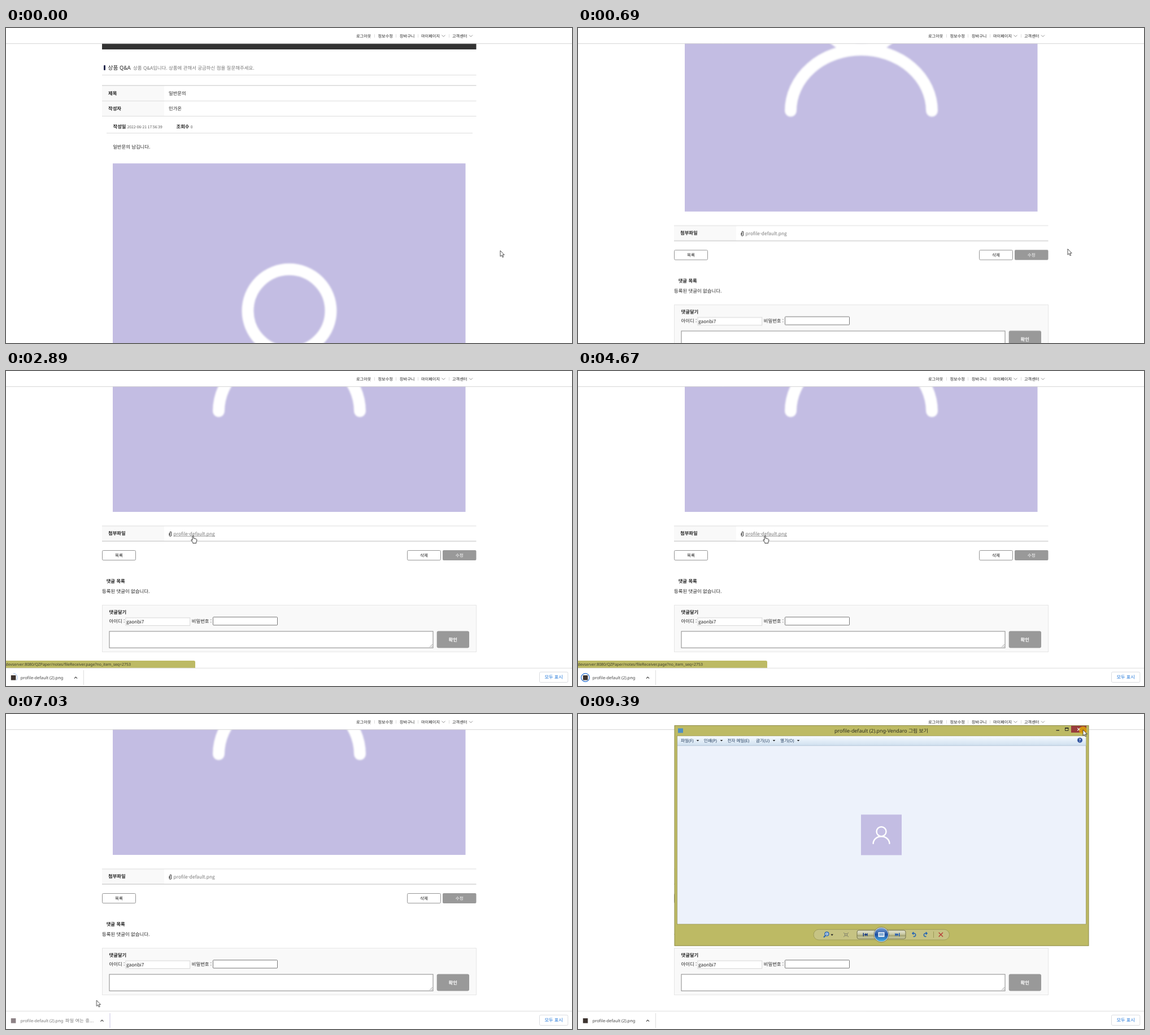
An HTML page that plays this animation: 1002 by 559 pixels, repeating every 9560 ms.

```html
<!DOCTYPE html>
<html lang="ko">
<head>
<meta charset="utf-8">
<title>Q&amp;A</title>
<style>
html, body { margin: 0; width: 100%; height: 100%; overflow: hidden; background: #fff; }
svg { display: block; width: 100vw; height: 100vh; }
text { font: 8.35px 'Noto Sans CJK KR', 'Noto Sans', sans-serif; fill: #222; white-space: pre; text-rendering: geometricPrecision; }
.b { font-weight: 700; }
.mid { text-anchor: middle; }
.small text { font-size: 7.2px; }
.ui text { font-family: 'Noto Sans', 'Noto Sans CJK KR', sans-serif; }
.menu text { font-size: 7.6px; fill: #1e395b; }
.line { stroke: #ddd; fill: none; }
.box { fill: #fff; stroke: #888; }
.grey { fill: #999; }
.th { fill: #f9f9f9; }

/* every part shares one clock */
.k { animation: 9.56s linear infinite; }
.step { animation-timing-function: step-end; }

#page { animation-name: scroll; }
@keyframes scroll {
  0%, 1.36% { transform: translateY(0); animation-timing-function: cubic-bezier(.333, .573, .667, .857); }
  7.22% { transform: translateY(-538px); animation-timing-function: cubic-bezier(.333, 1, .667, 1); }
  13.04%, 100% { transform: translateY(-614px); }
}

#cursor { animation-name: move; }
@keyframes move {
  0%, 1.36% { transform: translate(875px, 395px); }
  7.22% { transform: translate(867px, 392px); }
  10.88% { transform: translate(826px, 387px); animation-timing-function: ease-in-out; }
  17.15% { transform: translate(281px, 306px); animation-timing-function: ease-in-out; }
  20.71% { transform: translate(326px, 299px); }
  22.3%, 51.88% { transform: translate(331px, 292px); animation-timing-function: ease-in-out; }
  61.19%, 70.1% { transform: translate(73px, 540px); }
  71.13%, 72% { transform: translate(121px, 525px); animation-timing-function: ease-in-out; }
  79.6%, 80.54% { transform: translate(586px, 324px); animation-timing-function: ease-in-out; }
  87.5% { transform: translate(899px, 24px); }
  90.27%, 100% { transform: translate(894px, 28px); }
}
#arrow { animation-name: arrow; }
@keyframes arrow { 0% { opacity: 1; } 22.4% { opacity: 0; } 52.3% { opacity: 1; } }
#hand, #under { animation-name: hover; }
@keyframes hover { 0% { opacity: 0; } 22.4% { opacity: 1; } 52.3% { opacity: 0; } }
#click { animation-name: click; }
@keyframes click {
  0% { opacity: 0; } 23.43% { opacity: 1; } 24.37% { opacity: 0; }
  62.03% { opacity: 1; } 62.97% { opacity: 0; } 97.49% { opacity: 1; }
}

#status { animation-name: status; }
@keyframes status {
  0%, 22.6% { opacity: 0; transform: translateY(32px); }
  24.3%, 26.2% { opacity: 1; transform: translateY(32px); }
  28.77%, 53% { opacity: 1; transform: none; }
  55.4%, 100% { opacity: 0; transform: none; }
}
#shelf { animation-name: shelf; }
@keyframes shelf {
  0%, 26.2% { transform: translateY(33px); }
  28.77%, 100% { transform: none; }
}
#ring { animation-name: ring; }
@keyframes ring {
  0%, 28% { opacity: 0; stroke-dashoffset: 100; }
  34.2%, 39.64% { opacity: 1; stroke-dashoffset: 0; }
  43.93%, 45.5% { opacity: 0; stroke-dashoffset: 0; }
  48.85%, 51.88% { opacity: 1; stroke-dashoffset: 0; }
  55.4%, 100% { opacity: 0; stroke-dashoffset: 0; }
}
#ready { animation-name: ready; }
@keyframes ready { 0% { opacity: 1; } 62.97% { opacity: 0; } 97.8% { opacity: 1; } }
#opening { animation-name: opening; }
@keyframes opening { 0% { opacity: 0; } 62.97% { opacity: 1; } 97.8% { opacity: 0; } }

#viewer { transform-origin: 537px 215px; animation-name: viewer; }
@keyframes viewer {
  0%, 74.8% { opacity: 0; transform: scale(.92); animation-timing-function: ease-out; }
  76.9%, 100% { opacity: 1; transform: none; }
}
#prev { animation-name: prev; }
@keyframes prev { 0% { fill: #7584ad; } 81.07% { fill: #173a86; } }
#close { animation-name: close; }
@keyframes close { 0% { fill: #c75050; } 88.5% { fill: #e04343; } 97.49% { fill: #993d3d; } }
</style>
</head>
<body>
<svg viewBox="0 0 1002 559">
  <defs>
    <filter id="soft" x="-10%" y="-10%" width="120%" height="120%"><feGaussianBlur stdDeviation="1.8"/></filter>
    <g id="person" fill="none" stroke="#fff" stroke-width="21" stroke-linecap="round">
      <circle cx="312.5" cy="261.5" r="73.5"/>
      <path d="M187.5 445A125 108.5 0 0 1 437.5 445"/>
    </g>
    <path id="down" d="M-3-1.5 0 1.5 3-1.5" fill="none" stroke="#777" stroke-width=".8"/>
    <path id="up" d="M-2.5 1.3 0-1.2 2.5 1.3" fill="none" stroke="#444" stroke-width="1.2"/>
    <path id="tri" d="M-2.3-1.2H2.3L0 1.4Z" fill="#222"/>
    <path id="turn" d="M-2.6-2.2H.5A2.9 2.9 0 1 1-1.5 3.2M-.8-4.4-3-2.2-.8 0" fill="none" stroke="#2464b4" stroke-width="1.5"/>
    <path id="skip" d="M-4-3h1.6v6H-4ZM-1.8 0 1.4-3V3ZM1 0 4.2-3V3Z"/>
    <linearGradient id="bar" x2="0" y2="1">
      <stop stop-color="#f8fbfe"/><stop offset=".5" stop-color="#e2edf7"/><stop offset="1" stop-color="#d0e0ef"/>
    </linearGradient>
    <linearGradient id="metal" x2="0" y2="1">
      <stop stop-color="#e8e8d6"/><stop offset=".5" stop-color="#c4c49c"/><stop offset=".55" stop-color="#a3a374"/><stop offset="1" stop-color="#cfcfa4"/>
    </linearGradient>
    <linearGradient id="orb" x2="0" y2="1">
      <stop stop-color="#7fa6d8"/><stop offset=".5" stop-color="#1f4f9f"/><stop offset="1" stop-color="#49b4ee"/>
    </linearGradient>
  </defs>
  <rect width="1002" height="559" fill="#fff"/>

  <g id="page" class="k">
    <path d="M170 0H832.5V38H170Z" fill="#333"/>
    <rect x="173" y="66" width="3" height="9" rx="1.2" fill="#23284d"/>
    <text x="180.5" y="74" style="font-size:9.7px">상품 Q&amp;A</text>
    <text x="225" y="74" style="font-size:8.45px;fill:#777">상품 Q&amp;A입니다. 상품에 관해서 궁금하신 점을 질문해주세요.</text>
    <path class="th" d="M170 102H280V156H170Z"/>
    <path class="line" d="M170 83.5H832.5M170 129.5H832.5M170 156.5H832.5M178 186.5H826"/>
    <path class="line" d="M170 102H832.5" style="stroke:#c4c4c4"/>
    <text class="b" x="181" y="118.5">제목</text><text x="288" y="119.3">일반문의</text>
    <text class="b" x="181" y="145.5">작성자</text><text x="288" y="146.3">민가온</text>
    <text class="b" x="189.5" y="178">작성일</text>
    <text x="214.5" y="177.8" style="font-size:6.7px;fill:#555">2022-06-21 17:56:39</text>
    <text class="b" x="301.5" y="178">조회수</text>
    <text x="326.7" y="177.8" style="font-size:6.7px;fill:#555">0</text>
    <text x="189.2" y="214.3">일반문의 남깁니다.</text>
    <g transform="translate(189 240.3)">
      <rect width="624.5" height="623.7" fill="#c3bde3"/>
      <use href="#person" filter="url(#soft)"/>
    </g>

    <g transform="translate(0 614)">
      <path class="th" d="M170 275H280V302H170Z"/>
      <path class="line" d="M170 275H832.5M170 534.5H832.5"/>
      <path class="line" d="M170 302H832.5" style="stroke:#bbb"/>
      <text class="b" x="181" y="291.3">첨부파일</text>
      <path d="M289 288V291.2A1.9 1.9 0 0 0 292.8 291.2V286.6A1.3 1.3 0 0 0 290.2 286.6V291" fill="none" stroke="#444" stroke-width="1.1"/>
      <text x="296.6" y="291.9" style="fill:#777">profile-default.png</text>
      <path id="under" class="k step" d="M296.6 293.3H370" stroke="#888" stroke-width=".8"/>

      <g stroke-width=".9">
        <rect class="box" x="170.5" y="318.5" width="59" height="17.2" rx="2"/>
        <rect class="box" x="710.5" y="318.5" width="59" height="17.2" rx="2"/>
        <rect class="grey" x="773" y="318" width="59.5" height="18" rx="2"/>
      </g>
      <g class="mid" style="font-size:7.6px">
        <text x="200" y="330" style="font-size:7.6px">목록</text>
        <text x="740" y="330" style="font-size:7.6px">삭제</text>
        <text x="802.7" y="330" style="font-size:7.6px;fill:#fff;font-weight:500">수정</text>
      </g>
      <text class="b" x="177.7" y="375.6">댓글 목록</text>
      <text x="170" y="394" style="font-size:8.42px">등록된 댓글이 없습니다.</text>

      <rect x="170.5" y="415.5" width="662" height="83" fill="#f9f9f9" stroke="#e6e6e6"/>
      <text class="b" x="182.6" y="431">댓글달기</text>
      <text x="182.6" y="447">아이디 :</text>
      <rect class="box" x="212" y="438" width="113.7" height="13.7" style="stroke:#d8d8d8"/>
      <text x="213" y="448.3">gaonbi7</text>
      <text x="328.8" y="447">비밀번호 :</text>
      <rect class="box" x="366.5" y="436.7" width="114" height="14.3" rx="1" style="stroke:#777"/>
      <rect class="box" x="183" y="462" width="573" height="29.3" style="stroke:#888"/>
      <path d="M750 490 755 485M753 490 755 488" stroke="#777" stroke-width=".7"/>
      <rect class="grey" x="762.7" y="461.5" width="57.3" height="30" rx="3"/>
      <text class="b mid" x="791.3" y="479.7" style="fill:#fff">확인</text>
      <use href="#up" x="183" y="547.5"/>
      <text class="b" x="190.2" y="550.3">이전글</text>
    </g>
  </g>

  <g class="small">
    <path d="M0 0H1002V27.5H0Z" fill="#fff"/>
    <path class="line" d="M0 27.7H1002" style="stroke:#d4d4d4"/>
    <path class="line" d="M652.5 11V17M690.5 11V17M729.5 11V17M784.5 11V17"/>
    <text x="620" y="16.7">로그아웃</text>
    <text x="658.5" y="16.7">정보수정</text>
    <text x="697" y="16.7">장바구니</text>
    <text x="735" y="16.7">마이페이지</text>
    <text x="790" y="16.7">고객센터</text>
    <use href="#down" x="774.5" y="14"/><use href="#down" x="823" y="14"/>
  </g>

  <g id="status" class="k ui">
    <path d="M0 514H332.5Q335 514 335 516.5V527H0Z" fill="#bdba64"/>
    <text x="-.5" y="523" style="font-size:6.92px;fill:#3c3c2c">devserver:8080/QZPaper/notes/fileReceiver.page?no_item_seq=2753</text>
  </g>

  <g id="shelf" class="k ui">
    <path d="M0 527H1002V559H0Z" fill="#fff"/>
    <path class="line" d="M0 527.3H1002"/>
    <g id="ready" class="k step">
      <rect x="8.8" y="540" width="8.6" height="8.6" fill="#3d3430"/>
      <text x="25.7" y="547" style="font-size:7.4px;fill:#444">profile-default (2).png</text>
      <use href="#up" x="123.5" y="544.3"/>
      <path class="line" d="M137.5 531V557"/>
    </g>
    <g id="opening" class="k step">
      <rect x="8.8" y="540" width="8.6" height="8.6" fill="#8d8286"/>
      <text x="25.7" y="547" style="font-size:7.4px;fill:#777">profile-default (2).png</text>
      <text x="105" y="547" style="font-size:8px;letter-spacing:.3px;fill:#777">파일 여는 중...</text>
      <use href="#up" x="170" y="544.3"/>
      <path d="M184 531V557" stroke="#c9c5e4"/>
    </g>
    <circle id="ring" class="k" cx="13" cy="544" r="7.3" pathLength="100" stroke-dasharray="100" transform="rotate(-90 13 544)" fill="none" stroke="#2a72d4" stroke-width="1.3"/>
    <rect x="944.5" y="534.2" width="50.3" height="18.3" rx="2" fill="#fff" stroke="#dadce0"/>
    <text class="mid" x="969.7" y="546.2" style="font:8.2px 'Noto Sans CJK KR',sans-serif;fill:#1a73d8">모두 표시</text>
  </g>

  <g id="viewer" class="k ui">
    <rect x="171" y="20.5" width="733" height="390.7" fill="#bdba64" stroke="#8d8b48"/>
    <rect x="177" y="25.5" width="9" height="8" fill="#4f8fc4"/>
    <text class="mid" x="537" y="32.8" style="font-size:8.9px;fill:#2c2c20">profile-default (2).png-Vendaro 그림 보기</text>
    <path d="M846.5 29H852" stroke="#222" stroke-width="1.3"/>
    <path d="M862.5 25H868V29.5H862.5Z" fill="none" stroke="#222" stroke-width=".9"/>
    <path d="M862 25H868.5" stroke="#222" stroke-width="1.5"/>
    <path id="close" class="k step" d="M873 21H900V33H873Z"/>
    <path d="M884.2 24.8 889 29.6M889 24.8 884.2 29.6" stroke="#fff" stroke-width="1.2"/>

    <rect x="175.5" y="39" width="724" height="334" fill="#edf2fb" stroke="#98965a" stroke-width=".8"/>
    <path d="M176 39.4H899.3V56H176Z" fill="url(#bar)"/>
    <path d="M176 56H899.3" stroke="#a9bccf" stroke-width=".8"/>
    <g class="menu">
      <text x="182" y="50">파일(F)</text><use href="#tri" x="212" y="47.2"/>
      <text x="222.7" y="50">인쇄(P)</text><use href="#tri" x="254" y="47.2"/>
      <text x="264.5" y="50">전자 메일(E)</text>
      <text x="315" y="50">굽기(U)</text><use href="#tri" x="347" y="47.2"/>
      <text x="358" y="50">열기(O)</text><use href="#tri" x="390" y="47.2"/>
    </g>
    <circle cx="888.5" cy="46.5" r="4.5" fill="#2b4f9e" stroke="#8ea3c9" stroke-width=".7"/>
    <text class="b mid" x="888.5" y="49.2" style="font-size:7px;fill:#fff">?</text>
    <g transform="translate(501 178.5) scale(.1153)">
      <rect width="624.5" height="624" fill="#c3bde3"/><use href="#person"/>
    </g>

    <rect x="417" y="382.3" width="240.5" height="18.6" rx="9.3" fill="#c6c383" stroke="#9b9957" stroke-width=".9"/>
    <circle cx="440.5" cy="390.3" r="3.3" fill="#e8f1fb" stroke="#2464b4" stroke-width="1.5"/>
    <path d="M438.2 393 435 396.2" stroke="#2464b4" stroke-width="2"/>
    <path d="M438.8 390.3H442.2M440.5 388.6V392" stroke="#2464b4" stroke-width=".8"/>
    <use href="#tri" x="449.7" y="392"/>
    <path d="M470 388 472.5 390M479 388 476.5 390M470 395.5 472.5 393.5M479 395.5 476.5 393.5M472.5 390H476.5V393.5H472.5Z" fill="none" stroke="#7d7d68"/>
    <rect x="494" y="384" width="86" height="15" rx="3" fill="url(#metal)" stroke="#6e6d48" stroke-width=".9"/>
    <g id="prev" class="k step"><use href="#skip" x="508.5" y="391.5"/></g>
    <use href="#skip" transform="translate(565.5 391.5) scale(-1 1)" fill="#1e59b4"/>
    <circle cx="537" cy="391.5" r="12.6" fill="url(#orb)" stroke="#e5e6d8" stroke-width="1.2"/>
    <circle cx="537" cy="391.5" r="13.4" fill="none" stroke="#5c5c48" stroke-width=".7"/>
    <rect x="531.5" y="387.2" width="11" height="8.4" fill="#fff"/>
    <rect x="532.8" y="388.5" width="8.4" height="5.2" fill="#87aed6"/>
    <use href="#turn" x="595" y="391.5"/>
    <use href="#turn" transform="translate(615 391.5) scale(-1 1)"/>
    <path d="M629.5 386V397" stroke="#9b9957"/>
    <path d="M638.7 387.8 646 395.2M646 387.8 638.7 395.2" stroke="#b63a34" stroke-width="1.3"/>
  </g>

  <g id="cursor" class="k">
    <circle id="click" class="k step" r="7" cy="1" fill="#e8b400" fill-opacity=".72"/>
    <path id="arrow" class="k step" d="M0 0V10.4L2.4 8.2 4.1 12 5.7 11.3 4.1 7.6H7.2Z" fill="#fff" stroke="#222" stroke-width=".8" stroke-linejoin="round"/>
    <path id="hand" class="k step" d="M-1 1Q0-.6 1.1 1V5L2.8 5.2 4.6 5.7 6.2 6.5Q7 7 6.8 9L5.7 11.7V13.6H-.2V12.3L-3 8.6Q-3.4 7-2 7.3L-1 8.4Z" fill="#fff" stroke="#222" stroke-width=".9" stroke-linejoin="round"/>
  </g>
</svg>
</body>
</html>
```
